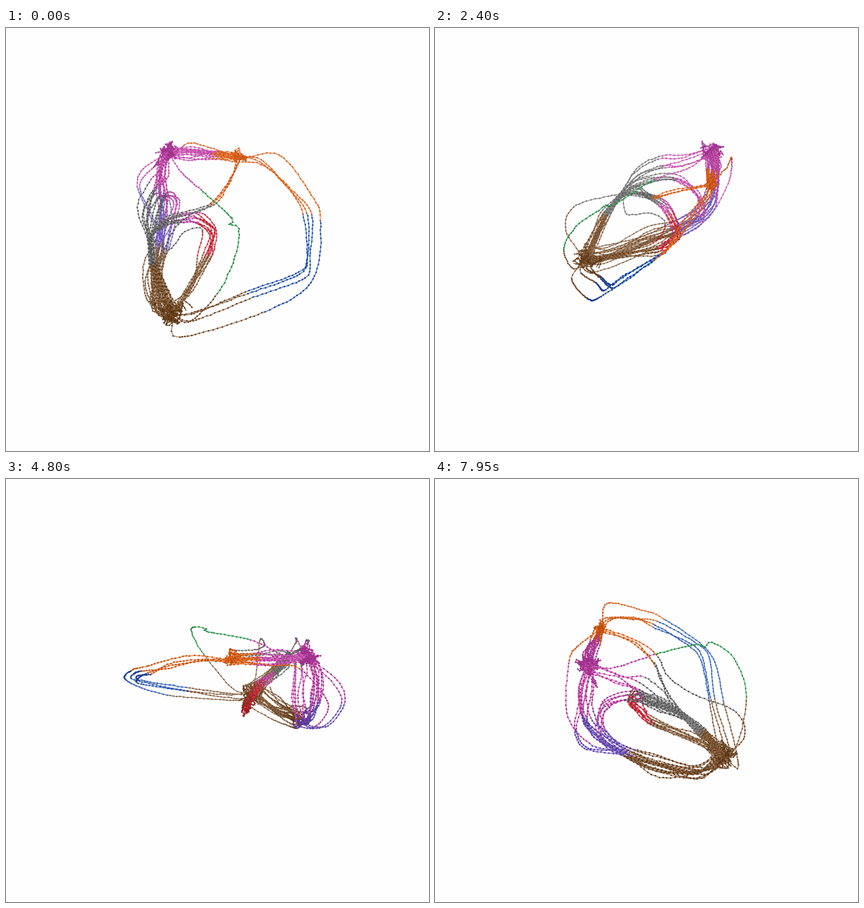
These frames come from a looping animation (640x640 px, 8 s). An HTML page with a canvas:

```html
<!DOCTYPE html>
<html>
<head>
<meta charset="utf-8">
<style>
  html, body { margin: 0; width: 100%; height: 100%; overflow: hidden; background: #fefefe; }
  canvas { display: block; }
</style>
</head>
<body>
<canvas id="stage" width="640" height="640"></canvas>
<script>
const ctx = document.getElementById('stage').getContext('2d');
const CX = 333, CY = 320, DIST = 2590;      // rotation centre and camera distance
const SIN = 0.5, COS = Math.sqrt(3) / 2;    // camera raised by 30 degrees
const LOOP = 8000, STEP = 150, TURN = 5 * Math.PI / 180;

// line colour, dot colour
const COLORS = {
  pink:    ['#da66c0', '#9c2d88'],
  magenta: ['#a93a96', '#9c2d88'],
  orange:  ['#e8722c', '#bd4a06'],
  blue:    ['#2f68c4', '#0d3288'],
  brown:   ['#957050', '#58310f'],
  umber:   ['#6d4320', '#58310f'],
  gray:    ['#888888', '#484848'],
  purple:  ['#8068cc', '#553898'],
  red:     ['#d83444', '#a41424'],
  green:   ['#35a556', '#157c35']
};

let seed = 7;
const rand = () => (seed = (seed * 16807) % 2147483647) / 2147483647;
const noise = () => (rand() + rand() + rand() - 1.5) * 1.6;
const noise3 = () => [noise(), noise(), noise()];

// Front-view position plus depth -> space
function toSpace([x, y, d]) {
  const v = y - CY;
  const z = (SIN * d * DIST - v * (DIST - COS * d)) / (COS * DIST - SIN * v);
  const s = DIST / (DIST - COS * d - SIN * z);
  return [(x - CX) / s, d, z];
}

const spline = (a, b, c, d, t) => b.map((_, k) =>
  b[k] + 0.5 * t * (c[k] - a[k] + t * (2 * a[k] - 5 * b[k] + 4 * c[k] - d[k] +
  t * (3 * (b[k] - c[k]) + d[k] - a[k]))));

const links = [];

// A path lists colour names and [x, y, depth, spread factor] points
function strands(count, spread, ...path) {
  for (let n = 0; n < count; n++) {
    const drift = noise3(), pts = [], tints = [];
    let tint;
    for (const item of path) {
      if (typeof item === 'string') { tint = item; continue; }
      const own = noise3(), w = spread * (item[3] ?? 1);
      pts.push(toSpace(item).map((v, k) => v + w * (0.8 * drift[k] + 0.5 * own[k])));
      tints.push(tint);
    }
    let prev = pts[0];
    for (let i = 0; i + 1 < pts.length; i++) {
      const b = pts[i], c = pts[i + 1], a = pts[i - 1] || b, d = pts[i + 2] || c;
      const parts = Math.ceil(Math.hypot(c[0] - b[0], c[1] - b[1], c[2] - b[2]) / 6.5);
      for (let j = 1; j <= parts; j++) {
        const p = spline(a, b, c, d, j / parts).map(v => v + noise() * 0.4);
        links.push({ a: prev, b: p, color: COLORS[tints[i]] });
        prev = p;
      }
    }
  }
}

// Hubs where the paths meet, and the trunks they share
const TOP = [245, 187, -104, 0.7], SIDE = [354, 196, -79, 0.8];
const BASE = [252, 430, 95, 1.4], NODE = [219, 320, 33, 0.5];
const up = ['brown', BASE, [238, 396, 78, 0.9], 'gray', [224, 358, 58, 0.7], NODE];
const down = ['brown', [236, 332, -55], [227, 370, -10, 1.4], [230, 420, 55, 1.4], BASE];

// Top to side
strands(15, 7, 'pink', TOP, [285, 187, -102], 'orange', [318, 191, -91], SIDE);

// Wide arcs from side to base
strands(1, 2, 'orange', SIDE, [410, 190, -68], [460, 250, -12], 'blue', [474, 288, 24],
  [461, 375, 95], 'brown', [390, 425, 110], [262, 465, 120], BASE);
strands(3, 6, 'orange', SIDE, [390, 205, -62], [431, 243, -22], 'blue', [457, 280, 13],
  [457, 345, 72], [446, 372, 91], 'brown', [370, 401, 92], [283, 433, 100], BASE);

// Green bypass
strands(1, 0, 'pink', TOP, [265, 218, -65], 'green', [295, 245, -5], [342, 288, 62],
  [338, 297, 75], [352, 304, 88], [347, 345, 121], 'brown', [320, 402, 138],
  [276, 445, 118], BASE);

// Base to side
strands(2, 5, ...up, [238, 292, 14], [275, 279, 6], 'orange', [308, 268, -1],
  [338, 234, -30], SIDE);
strands(1, 4, 'brown', BASE, [232, 405, 118], 'gray', [234, 360, 106], [248, 310, 45],
  [280, 276, 7], 'orange', [320, 258, -4], [338, 234, -30], SIDE);

// Top to base through purple
strands(10, 8, 'pink', TOP, [239, 213, -115], 'purple', [241, 250, -113],
  [242, 285, -98], ...down);
strands(2, 5, 'pink', TOP, [208, 213, -120], 'purple', [201, 240, -131],
  [222, 285, -110], ...down);
strands(1, 0, 'orange', SIDE, [305, 180, -115], 'pink', [270, 177, -130], [229, 228, -137],
  'purple', [234, 290, -106], ...down);

// Base up and over: to purple, to the top, through red
strands(6, 8, ...up, [222, 286, 2], 'pink', [236, 256, -50], [251, 262, -85],
  'purple', [245, 295, -88], ...down);
strands(5, 9, ...up, [212, 272, -2], 'pink', [226, 235, -37], [240, 213, -66], TOP);
strands(8, 6, ...up, [238, 299, 5], 'pink', [266, 288, -20], 'red', [290, 288, -30],
  [315, 306, -38], [312, 328, -22], 'brown', [306, 345, -10], [276, 400, 60], BASE);
strands(1, 0, ...up, [247, 335, 30], [270, 308, -5], 'red', [297, 305, -22],
  'brown', [290, 345, -5], [283, 390, 55], BASE);

// Knots at the hubs
const knot = (count, spread, color, hub) => strands(count, spread, color, ...Array(6).fill(hub));
knot(22, 13, 'magenta', TOP);
knot(8, 9, 'orange', SIDE);
knot(14, 9, 'umber', BASE);

function project([x, y, z], c, s) {
  const u = x * c - y * s, d = x * s + y * c;
  const near = COS * d + SIN * z, k = DIST / (DIST - near);
  return { x: CX + u * k, y: CY + (SIN * d - COS * z) * k, near };
}

function draw(step) {
  const c = Math.cos(step * TURN), s = Math.sin(step * TURN);
  const items = links.map(l => ({ p: project(l.a, c, s), q: project(l.b, c, s), color: l.color }));
  items.sort((a, b) => a.q.near - b.q.near);
  ctx.globalAlpha = 1;
  ctx.fillStyle = '#fefefe';
  ctx.fillRect(0, 0, 640, 640);
  ctx.lineWidth = 1.3;
  for (const { p, q, color } of items) {
    ctx.globalAlpha = 0.9;
    ctx.strokeStyle = color[0];
    ctx.beginPath();
    ctx.moveTo(p.x, p.y);
    ctx.lineTo(q.x, q.y);
    ctx.stroke();
    ctx.globalAlpha = Math.max(0.5, Math.min(1, 0.8 + q.near / 450));
    ctx.fillStyle = color[1];
    ctx.beginPath();
    ctx.arc(q.x, q.y, 1.25, 0, 7);
    ctx.fill();
  }
}

let shown = -1;
const start = performance.now();
function tick() {
  const step = Math.floor((performance.now() - start) % LOOP / STEP);
  if (step !== shown) draw(shown = step);
  requestAnimationFrame(tick);
}
tick();
</script>
</body>
</html>
```
